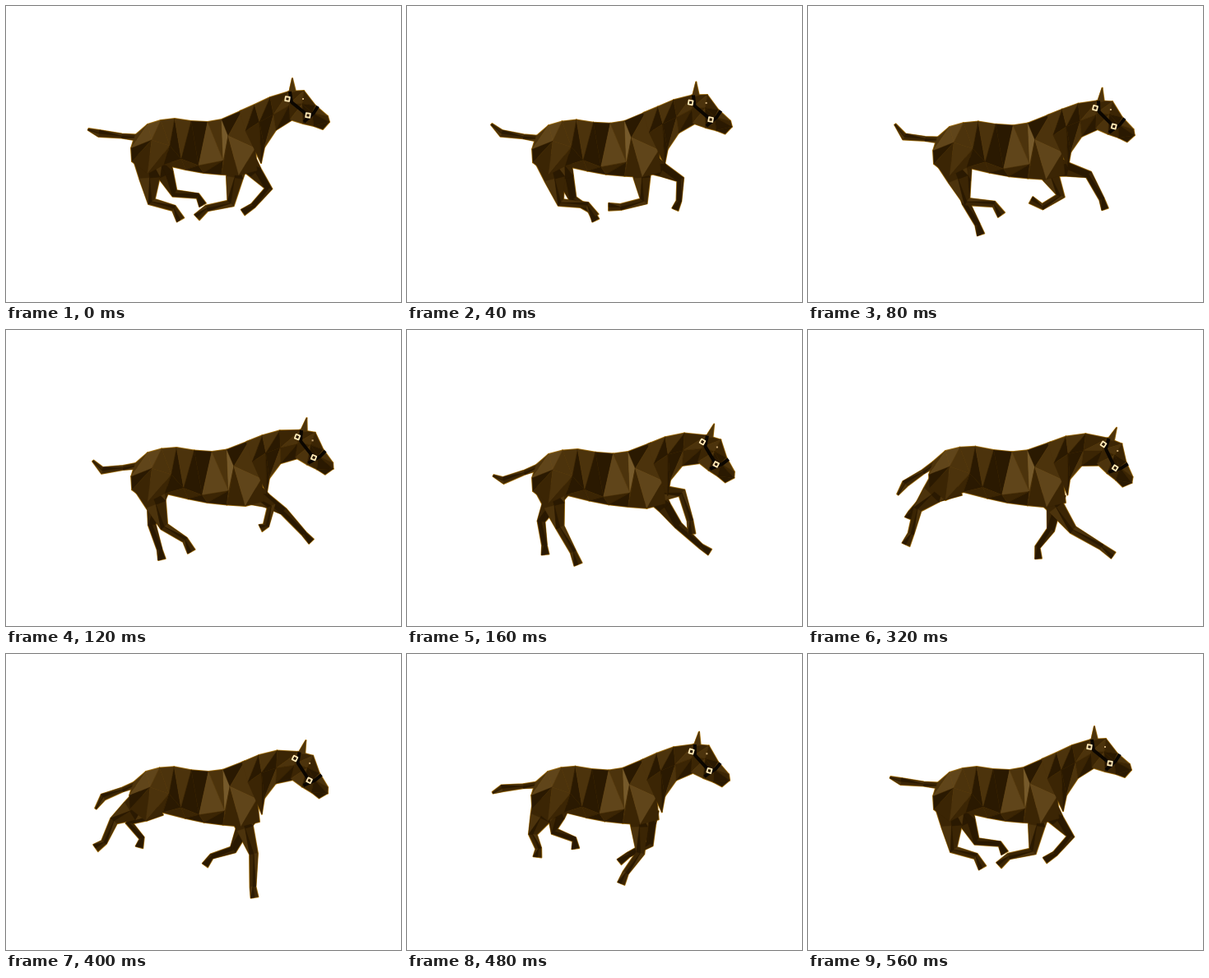
An HTML page with a canvas for the animation above (0.6 s loop, 480 px wide and 360 px high).

```html
<!DOCTYPE html>
<html>
<head>
<meta charset="utf-8">
<title>Galloping horse</title>
<style>
html, body { margin: 0; background: #fff; overflow: hidden; }
canvas { display: block; }
</style>
</head>
<body>
<canvas id="stage" width="480" height="360"></canvas>
<script>
const ctx = document.getElementById('stage').getContext('2d');
const STEP = 40, STEPS = 15, CYCLE = 14;
const SHADES = { a: '#170d00', b: '#2a1901', c: '#3b2504', d: '#4c330c', e: '#60451a', f: '#765a2b' };
const EDGE = '#b07c16';

// Six key poses, two steps apart; the last gap is twice as long.
const rump = keys([[0, 0], [0, 3], [0, 7], [-2, 6], [-5, 3], [-2, -1]]);
const chest = keys([[0, 0], [7, 5], [9, 11], [10, 13], [8, 10], [3, 4]]);
const head = keys([[342, 113, 0], [349, 124, 6], [359, 136, 20], [365, 145, 29], [359, 139, 25], [351, 127, 18]]);

// Limbs: root on the resting body, position of the extra upper joint, widths, lower joints.
const tail = { root: [159, 160], upper: 0.4, widths: [7, 5, 8, 2], poses: keys([
  [113, 155, 100, 150], [117, 159, 106, 144], [117, 183, 105, 177],
  [121, 188, 106, 193], [118, 187, 109, 200], [118, 174, 109, 188]]) };
const farHind = { root: [184, 184], upper: 0.5, widths: [30, 19, 9, 6, 9], poses: keys([
  [205, 228, 233, 231, 239, 242], [192, 240, 206, 266, 210, 278], [163, 233, 167, 262, 168, 273],
  [152, 234, 137, 247, 133, 253], [136, 211, 125, 222, 122, 229], [150, 206, 165, 224, 162, 235]]) };
const nearHind = { root: [172, 180], upper: 0.5, widths: [38, 25, 10, 7, 10], poses: keys([
  [177, 238, 204, 246, 212, 260], [193, 238, 226, 241, 235, 254], [186, 240, 202, 270, 208, 285],
  [157, 236, 166, 268, 171, 281], [133, 218, 125, 248, 119, 261], [131, 203, 119, 229, 109, 236]]) };
const farFore = { root: [293, 190], upper: 0.4, widths: [24, 16, 9, 6, 8], poses: keys([
  [319, 222, 300, 243, 288, 251], [341, 205, 357, 235, 361, 247], [330, 238, 357, 263, 368, 270],
  [325, 240, 330, 275, 336, 288], [295, 243, 279, 264, 280, 278], [276, 238, 250, 246, 242, 257]]) };
const nearFore = { root: [281, 188], upper: 0.4, widths: [28, 20, 10, 7, 9], poses: keys([
  [273, 240, 244, 246, 232, 257], [307, 231, 285, 244, 271, 236], [334, 198, 344, 232, 346, 248],
  [338, 201, 362, 233, 370, 244], [322, 243, 357, 264, 371, 274], [301, 243, 300, 283, 302, 296]]) };

// Resting mesh: rows of points; each gap between rows is a strip of shaded triangles.
const torso = mesh([
  '157,157 172,144 188,139 205,137 225,140 245,141 262,138 287,127',
  '152,173 177,163 199,170 213,186 234,194 264,188 270,158 303,173',
  '153,189 172,204 192,193 218,199 240,203 262,205 283,206 305,200'
], ['deeddbdbbedfbd', 'bcdcbccbcbdcec']);
const neck = mesh([
  '284,128 302,120 321,111 344,104',
  '291,152 308,141 325,132 344,121',
  '310,191 314,172 328,151 347,139'
], ['dbdbcd', 'cbbdcb']);
const skull = mesh([
  '343,104 362,103 376,121 391,134',
  '344,119 360,119 372,130 393,141',
  '345,138 361,143 374,146 385,150'
], ['cdcbdc', 'cdbcbb']);
const ear = mesh(['344,106 348,88', '344,106 352,104'], ['cd']);
const body = [...torso, ...neck, ...skull, ...ear];

const halter = [points('345,104 347,117 368,134'), points('379,122 374,130 362,141')];
const buckles = points('342,113 367,133');

function points(text) {
  return text.split(' ').map(p => p.split(',').map(Number));
}

function keys(list) {
  const [d, c, , , a, b] = [list[1], list[0], 0, 0, list[4], list[5]];
  return [...list, b.map((v, j) => (9 * (v + c[j]) - a[j] - d[j]) / 16)];
}

function mesh(rows, shades) {
  const grid = rows.map(points);
  return shades.flatMap((letters, r) => [...letters].map((letter, n) => {
    const i = n >> 1, top = grid[r], low = grid[r + 1];
    const pts = n % 2 ? [top[i + 1], low[i + 1], low[i]] : [top[i], top[i + 1], low[i]];
    return { color: SHADES[letter], pts };
  }));
}

const clamp = v => Math.max(0, Math.min(1, v));
const mix = (a, b, t) => a + (b - a) * t;

// Periodic Catmull-Rom through a list of key poses.
function tween(list, phase) {
  const i = Math.floor(phase), t = phase - i, n = list.length;
  const [p, q, r, s] = [-1, 0, 1, 2].map(d => list[(i + d + n) % n]);
  return q.map((b, j) => {
    const a = p[j], c = r[j], d = s[j];
    return b + t / 2 * (c - a + t * (2 * a - 5 * b + 4 * c - d + t * (3 * (b - c) + d - a)));
  });
}

// Moves a resting point with rump, chest and head.
function makeSkin(phase) {
  const r = tween(rump, phase), c = tween(chest, phase);
  const [hx, hy, degrees] = tween(head, phase);
  const angle = degrees * Math.PI / 180, cos = Math.cos(angle), sin = Math.sin(angle);
  return ([x, y]) => {
    const front = clamp((x - 175) / 115);
    const bend = clamp((x - 290 + (150 - y) * 0.3) / 60);
    const dx = x - 342, dy = y - 113;
    return [
      mix(x + mix(r[0], c[0], front), hx + dx * cos - dy * sin, bend),
      mix(y + mix(r[1], c[1], front), hy + dx * sin + dy * cos, bend)
    ];
  };
}

function stroke(pts, color, width, closed = true) {
  ctx.beginPath();
  pts.forEach(p => ctx.lineTo(...p));
  if (closed) ctx.closePath();
  ctx.lineWidth = width;
  ctx.strokeStyle = color;
  ctx.stroke();
}

function fill(pts, color) {
  stroke(pts, color, 0.5);
  ctx.fillStyle = color;
  ctx.fill();
}

function buildLimb({ root, upper, widths, poses }, phase, skin) {
  const flat = tween(poses, phase), start = skin(root);
  const joints = [start, start.map((v, j) => mix(v, flat[j], upper))];
  for (let i = 0; i < flat.length; i += 2) joints.push([flat[i], flat[i + 1]]);
  const side = sign => joints.map(([x, y], i) => {
    const a = joints[Math.max(0, i - 1)], b = joints[Math.min(joints.length - 1, i + 1)];
    const angle = Math.atan2(b[1] - a[1], b[0] - a[0]), w = sign * widths[i] / 2;
    return [x - Math.sin(angle) * w, y + Math.cos(angle) * w];
  });
  const left = side(1), right = side(-1);
  return { joints, left, right, hull: [...left, ...[...right].reverse()] };
}

function paintLimb({ joints, left, right, hull }, base, light) {
  fill(hull, base);
  for (let i = 0; i < joints.length - 1; i++) {
    const edge = i % 2 ? left : right;
    fill([joints[i], edge[i], edge[i + 1]], light);
    fill([joints[i], joints[i + 1], edge[i + 1]], SHADES.b);
  }
}

function paintHalter(skin, angle) {
  halter.forEach(strap => stroke(strap.map(skin), '#0b0600', 4, false));
  for (const buckle of buckles) {
    ctx.save();
    ctx.translate(...skin(buckle));
    ctx.rotate(angle);
    ctx.strokeStyle = '#ffe9b8';
    ctx.lineWidth = 1.8;
    ctx.fillStyle = SHADES.b;
    ctx.fillRect(-2.5, -2.5, 5, 5);
    ctx.strokeRect(-2.5, -2.5, 5, 5);
    ctx.restore();
  }
  const [x, y] = skin([361, 113]);
  ctx.fillStyle = '#c9a874';
  ctx.fillRect(x - 1, y - 1, 2, 2);
}

function draw(now) {
  const phase = Math.floor(now / STEP) % STEPS % CYCLE / 2;
  const skin = makeSkin(phase);
  const limb = part => buildLimb(part, phase, skin);
  const far = [farHind, farFore].map(limb);
  const near = [tail, nearHind, nearFore].map(limb);
  const faces = body.map(({ color, pts }) => ({ color, pts: pts.map(skin) }));

  ctx.fillStyle = '#fff';
  ctx.fillRect(0, 0, 480, 360);
  ctx.lineJoin = 'round';
  [...far, ...near].forEach(l => stroke(l.hull, EDGE, 2));
  faces.forEach(f => stroke(f.pts, EDGE, 2));

  far.forEach(l => paintLimb(l, SHADES.b, SHADES.c));
  near.forEach(l => paintLimb(l, SHADES.c, SHADES.d));
  faces.forEach(f => fill(f.pts, f.color));
  paintHalter(skin, (tween(head, phase)[2] + 8) * Math.PI / 180);
}

function loop() {
  draw(performance.now());
  requestAnimationFrame(loop);
}
loop();
</script>
</body>
</html>
```
